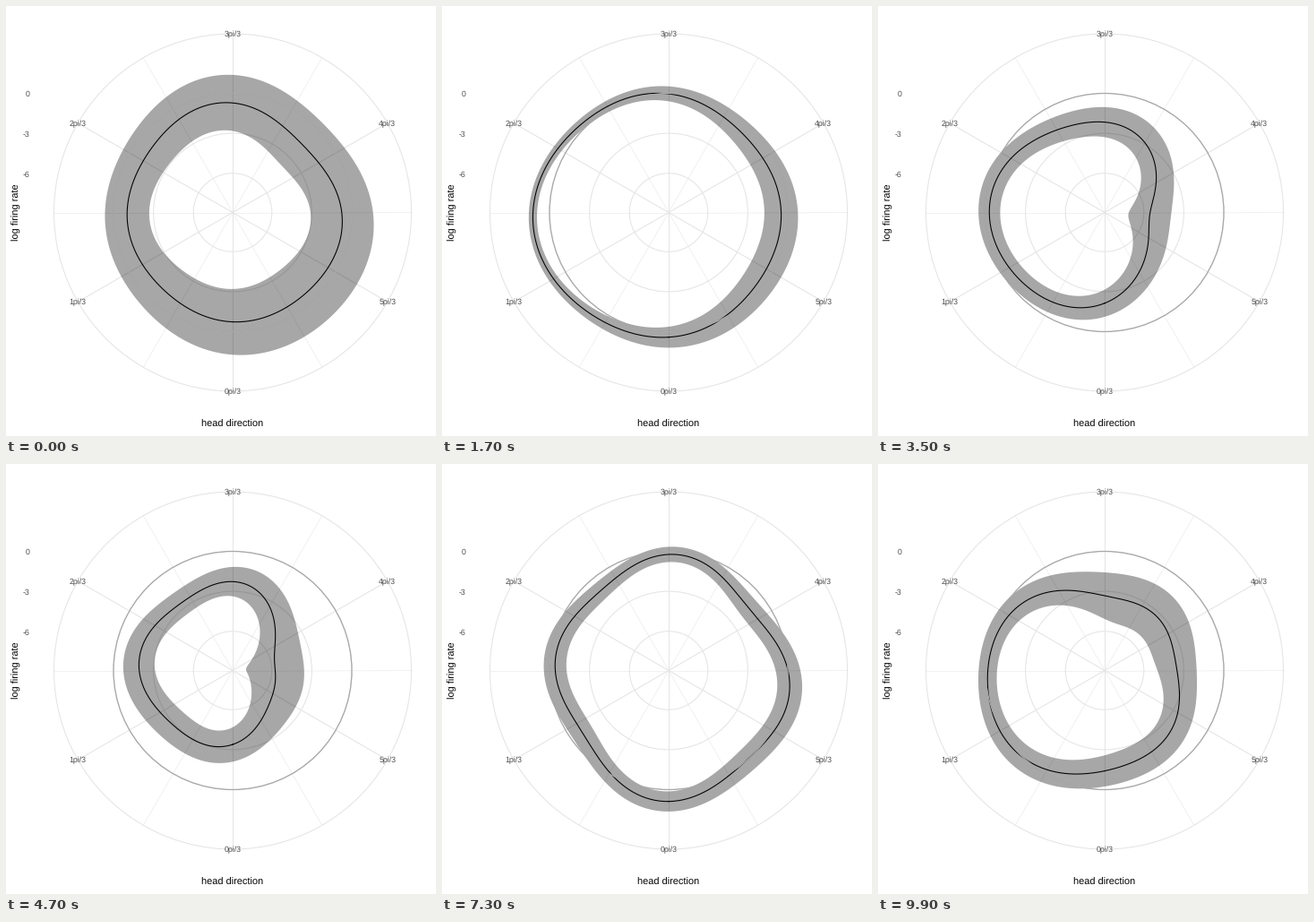
These frames come from a looping animation (480x480 px, 10000 ms). A matplotlib script:

```python
import numpy as np
import matplotlib
import matplotlib.pyplot as plt
from matplotlib.animation import FuncAnimation
from matplotlib.patches import Circle, Polygon

matplotlib.rcParams.update({"font.family": "Liberation Sans", "text.hinting": "none"})

SIZE, DPI = 480, 72
CX, CY = 253, 230.5
RIM = 199.5
MAJOR, MINOR = "#e5e5e5", "#eeeeee"
THETA = np.radians(np.arange(361))   # clockwise from the bottom

# Each pose is a pair of waves: the mean rate and the half width of its band.
# A wave is a base radius followed by its harmonics as phasors.
POSES = {
    0: ([118.3, 2.1 - .7j, 1.2 - 3.5j, -2.2 + 1.3j, 2.7 - .3j], [31.9, 2.7 - 5.1j, 2.1 - .7j]),
    5: ([142.1, 1 + .3j, -1 - 5.8j, -3.2 + .6j, 3.4 - 1.2j], [14, 4.4 - 8.9j, -1.8 - .2j]),
    13: ([118, 6.4 + 25.9j, -.5 + 5.8j, 2.3 - 1.3j, .8 + .4j], [12.7, -1.5 - 4.3j, .9 - 1.4j]),
    24: ([80.3, -7.1 + 25.2j, 7.5 + 1.2j, -1.2 - 3.2j, 3.1 + 2.4j], [21.4, 1.4 - 7.3j, -3.6 + 1j]),
    32: ([98, 16.4 - 4.4j, 7 + 2.3j, -.6 - .2j, 8.1 + 2.2j], [15.2, .8 + .5j, -1.5 - .1j]),
    42: ([139.3, -5.7 + 18.4j, 6.3 - 3.3j, 3.4 - 1.8j, 2.3 + 1.9j], [10.5, 1.1 - 3.4j, -1.5 + .3j]),
    50: ([105, 13.5 + 23.7j, -3.9 + .4j, .8 - 1.1j, -3.3 + .6j], [18.9, -4.3 - 5.8j, 2.8 + 2j]),
}
TIMES = np.array(list(POSES), float)
MEANS, HALVES = (np.array(waves) for waves in zip(*POSES.values()))

# Passing bulges: start, end, direction in degrees, height
BULGES = [(13, 24, 270, -11), (24, 32, 182, 28), (32, 42, 290, 20)]


def ease(t, rows):
    """Smooth cubic motion through the rows at TIMES."""
    slope = np.gradient(rows, TIMES, axis=0)
    i = min(np.searchsorted(TIMES, t, side="right") - 1, len(TIMES) - 2)
    h = TIMES[i + 1] - TIMES[i]
    u = (t - TIMES[i]) / h
    return ((1 + 2 * u) * (1 - u) ** 2 * rows[i] + u * (1 - u) ** 2 * h * slope[i]
            + u * u * (3 - 2 * u) * rows[i + 1] + u * u * (u - 1) * h * slope[i + 1])


def wave(phasors):
    n = np.arange(len(phasors))
    return (phasors * np.exp(-1j * np.outer(THETA, n))).real.sum(axis=1)


def curves(t):
    mean = wave(ease(t, MEANS))
    half = np.maximum(wave(ease(t, HALVES)), 4)
    for start, end, deg, height in BULGES:
        if start < t < end:
            swell = height * np.sin(np.pi * (t - start) / (end - start)) ** 2
            mean += swell * np.exp(3.5 * (np.cos(THETA - np.radians(deg)) - 1))
    return mean, half


def polar(r, a=THETA):
    return np.column_stack([CX - r * np.sin(a), CY + r * np.cos(a)])


fig = plt.figure(figsize=(SIZE / DPI, SIZE / DPI), dpi=DPI, facecolor="white")
ax = fig.add_axes([0, 0, 1, 1])
ax.set(xlim=(0, SIZE), ylim=(SIZE, 0))
ax.axis("off")


def ring(r, color, lw, z):
    ax.add_patch(Circle((CX, CY), r, fill=False, ec=color, lw=lw, zorder=z))


def tick(x, y, label, ha):
    ax.text(x, y + 3.2, label, size=8.8, color="#4d4d4d", ha=ha, va="baseline", zorder=6)


for k in range(12):
    x, y = polar(RIM, k * np.pi / 6)[0]
    major = k % 2 == 0
    ax.plot([CX, x], [CY, y], color=MAJOR if major else MINOR,
            lw=1.07 if major else 0.8, zorder=1 + major / 10)
    if major:
        tick(x, y, f"{k // 2}pi/3", "center")

for rate in (-6, -3, 0):
    r = 133 + 14.87 * rate
    ring(r, MAJOR, 1.07, 1.2)
    tick(26.5, CY - r + 0.5, str(rate), "right")
ring(RIM, MAJOR, 1.07, 1.2)
ring(133, "#a9a9a9", 1.3, 5)

ax.text(CX, 470, "head direction", size=11, ha="center", va="baseline")
ax.text(11.5, CY, "log firing rate", size=11, rotation=90, ha="center", va="center")

ribbon = ax.add_patch(Polygon(np.zeros((3, 2)), fc=(0, 0, 0, 0.345), ec="none", lw=0, zorder=3))
line, = ax.plot([], [], color="black", lw=1.07, zorder=4)


def draw(i):
    mean, half = curves((i + 1) // 2)
    ribbon.set_xy(np.vstack([polar(mean + half), polar(mean - half)[::-1]]))
    line.set_data(*polar(mean).T)
    return ribbon, line


anim = FuncAnimation(fig, draw, frames=100, interval=100, repeat=True, repeat_delay=0)
plt.show()
```
